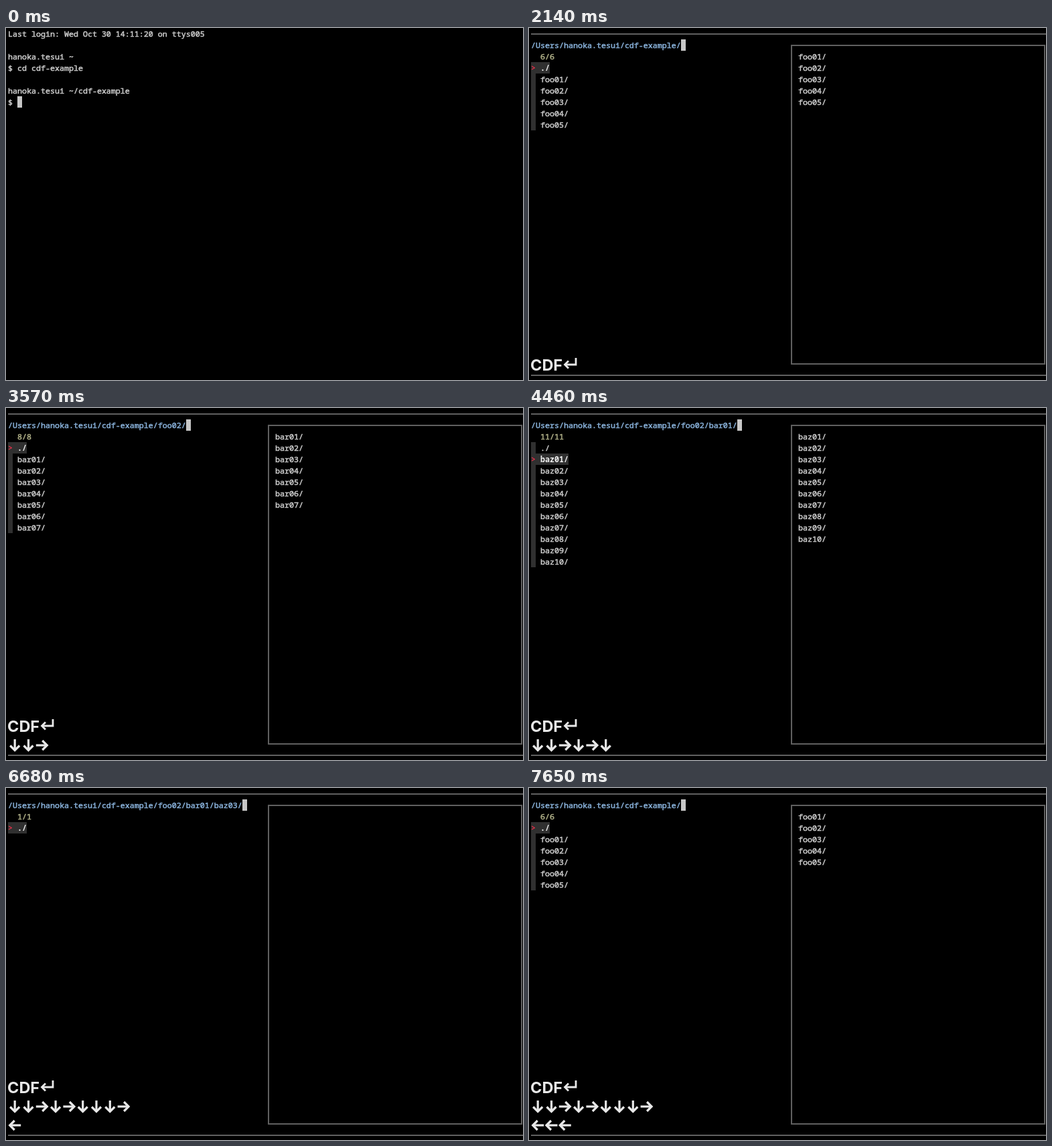
Write an HTML page with a canvas that moves like this. It is 772 px wide and 526 px high and loops after 8 s.

```html
<!DOCTYPE html>
<html lang="en">
<head>
<meta charset="utf-8">
<title>Directory finder demo</title>
<style>
  html, body { margin: 0; width: 772px; height: 526px; overflow: hidden; background: #000; }
  canvas { display: block; }
</style>
</head>
<body>
<canvas id="stage" width="772" height="526"></canvas>
<script>
const ctx = document.getElementById('stage').getContext('2d');
const LOOP = 8000;
const LAG = 80;      // the terminal answers a key this much later
const PAUSE = 800;   // a longer gap starts a new line of shown keys
const COL = 7, ROW = 17, LEFT = 3;
const USER = 'hanoka.tesui';
const TEXT = '#c7c7c7', FRAME = '#606060', SHADE = '#303030', KEY = '#e8e8e8';

// Nested directories: path part, then the prefix and count of the children.
const LEVELS = [
  { part: `/Users/${USER}/cdf-example/`, prefix: 'foo', count: 5 },
  { part: 'foo02/', prefix: 'bar', count: 7 },
  { part: 'bar01/', prefix: 'baz', count: 10 },
  { part: 'baz03/', prefix: '', count: 0 }
];

// Bursts of keys pressed at an even pace.
const BURSTS = [
  { keys: 'CD', at: 1070, gap: 90 },
  { keys: 'F', at: 1520 },
  { keys: '↵', at: 2050 },
  { keys: '↓↓', at: 2950, gap: 170 },
  { keys: '→', at: 3480 },
  { keys: '↓→', at: 4020, gap: 170 },
  { keys: '↓↓↓', at: 4460, gap: 170 },
  { keys: '→', at: 5070 },
  { keys: '←←←', at: 6680, gap: 440 }
];
const PRESSES = BURSTS.flatMap(({ keys, at, gap = 0 }) =>
  [...keys].map((key, i) => ({ key, at: at + i * gap })));

// Replays the given keys; depth -1 is the shell.
function replay(presses) {
  const state = { typed: '', depth: -1, selected: 0 };
  for (const { key } of presses) {
    if (key === '↓') {
      state.selected++;
    } else if (key === '→' || key === '↵') {
      state.depth++;
      state.selected = 0;
    } else if (key === '←') {
      state.depth--;
      state.selected = 0;
    } else {
      state.typed += key.toLowerCase();
    }
  }
  return state;
}

function cells(col, row, width, height, color) {
  ctx.fillStyle = color;
  ctx.fillRect(LEFT + col * COL, row * ROW, width * COL, height * ROW);
}

// A thin outline thickens the regular weight.
function write(text, col, row, color = TEXT, weight = 400) {
  const x = LEFT + col * COL, y = row * ROW + 13;
  ctx.font = `${weight} ${COL / 0.6}px "Noto Sans Mono", "DejaVu Sans Mono", monospace`;
  ctx.fillStyle = ctx.strokeStyle = color;
  ctx.fillText(text, x, y);
  if (weight < 700) {
    ctx.lineWidth = 0.55;
    ctx.strokeText(text, x, y);
  }
}

function children({ prefix, count }) {
  return Array.from({ length: count }, (_, i) => `${prefix}${String(i + 1).padStart(2, '0')}/`);
}

function drawShell(typed) {
  write('Last login: Wed Oct 30 14:11:20 on ttys005', 0, 0);
  write(`${USER} ~`, 0, 2);
  write('$ cd cdf-example', 0, 3);
  write(`${USER} ~/cdf-example`, 0, 5);
  write('$ ' + typed, 0, 6);
  cells(2 + typed.length, 6, 1, 1, TEXT);
}

function drawFrames() {
  ctx.fillStyle = ctx.strokeStyle = FRAME;
  ctx.lineWidth = 2;
  ctx.fillRect(LEFT, 8, 769, 2);
  ctx.fillRect(LEFT, 518, 769, 2);
  ctx.strokeRect(392, 26, 378, 476);
}

function drawFinder({ depth, selected }, preview) {
  drawFrames();
  const path = LEVELS.slice(0, depth + 1).map(level => level.part).join('');
  const items = ['./', ...children(LEVELS[depth])];
  write(path, 0, 1, '#87afd7');
  cells(path.length, 1, 1, 1, TEXT);
  write(`${items.length}/${items.length}`, 2, 2, '#afaf87');
  cells(0, 3, 1, items.length, SHADE);
  items.forEach((item, i) => {
    const row = 3 + i;
    if (i === selected) {
      cells(0, row, 2 + item.length, 1, SHADE);
      write('>', 0, row, '#dc3048', 700);
      write(item, 2, row, '#f0f0f0', 700);
    } else {
      write(item, 2, row);
    }
  });
  children(LEVELS[preview]).forEach((item, i) => write(item, 57, 2 + i));
}

function polyline(...points) {
  ctx.beginPath();
  points.forEach(([x, y]) => ctx.lineTo(x, y));
  ctx.stroke();
}

function drawArrow(x, y, angle) {
  ctx.save();
  ctx.translate(x, y);
  ctx.rotate(angle);
  ctx.lineWidth = 3.2;
  polyline([-9, 0], [7.5, 0]);
  polyline([0.5, -7], [7.5, 0], [0.5, 7]);
  ctx.restore();
}

function drawReturn(x, y) {
  ctx.lineWidth = 2.8;
  polyline([x + 19, y - 19], [x + 19, y - 9], [x + 3, y - 9]);
  polyline([x + 8, y - 14.5], [x + 2.5, y - 9], [x + 8, y - 3.5]);
}

function keyLines(presses) {
  const lines = [];
  presses.forEach(({ key, at }, i) => {
    if (i === 0 || at - presses[i - 1].at > PAUSE) lines.push('');
    lines[lines.length - 1] += key;
  });
  return lines;
}

function drawKeys(presses) {
  const angles = { '→': 0, '↓': Math.PI / 2, '←': Math.PI };
  const lines = keyLines(presses);
  ctx.font = '700 23.5px Inter, "Liberation Sans", sans-serif';
  ctx.fillStyle = ctx.strokeStyle = KEY;
  lines.forEach((line, i) => {
    const base = 512 - 28 * (lines.length - 1 - i);
    ctx.fillText(line.replace(/[^A-Z]/g, ''), 2, base);
    if (line.endsWith('↵')) drawReturn(51, base);
    [...line].forEach((key, k) => {
      if (key in angles) drawArrow(13.2 + 20.3 * k, base - 8, angles[key]);
    });
  });
}

function render(now) {
  const time = now % LOOP;
  const shown = PRESSES.filter(press => press.at <= time);
  const answered = shown.filter(press => press.at + LAG <= time);
  const settled = replay(answered);
  // The pointer moves at once, the preview follows later.
  const current = replay(shown.filter(press => press.key === '↓' || answered.includes(press)));

  ctx.fillStyle = '#000';
  ctx.fillRect(0, 0, 772, 526);
  if (current.depth < 0) drawShell(current.typed);
  else drawFinder(current, settled.depth + Math.sign(settled.selected));
  drawKeys(shown);
}

let start;
function tick(now) {
  start ??= now;
  render(Math.max(0, now - start));
  requestAnimationFrame(tick);
}
render(0);
requestAnimationFrame(tick);
</script>
</body>
</html>
```
